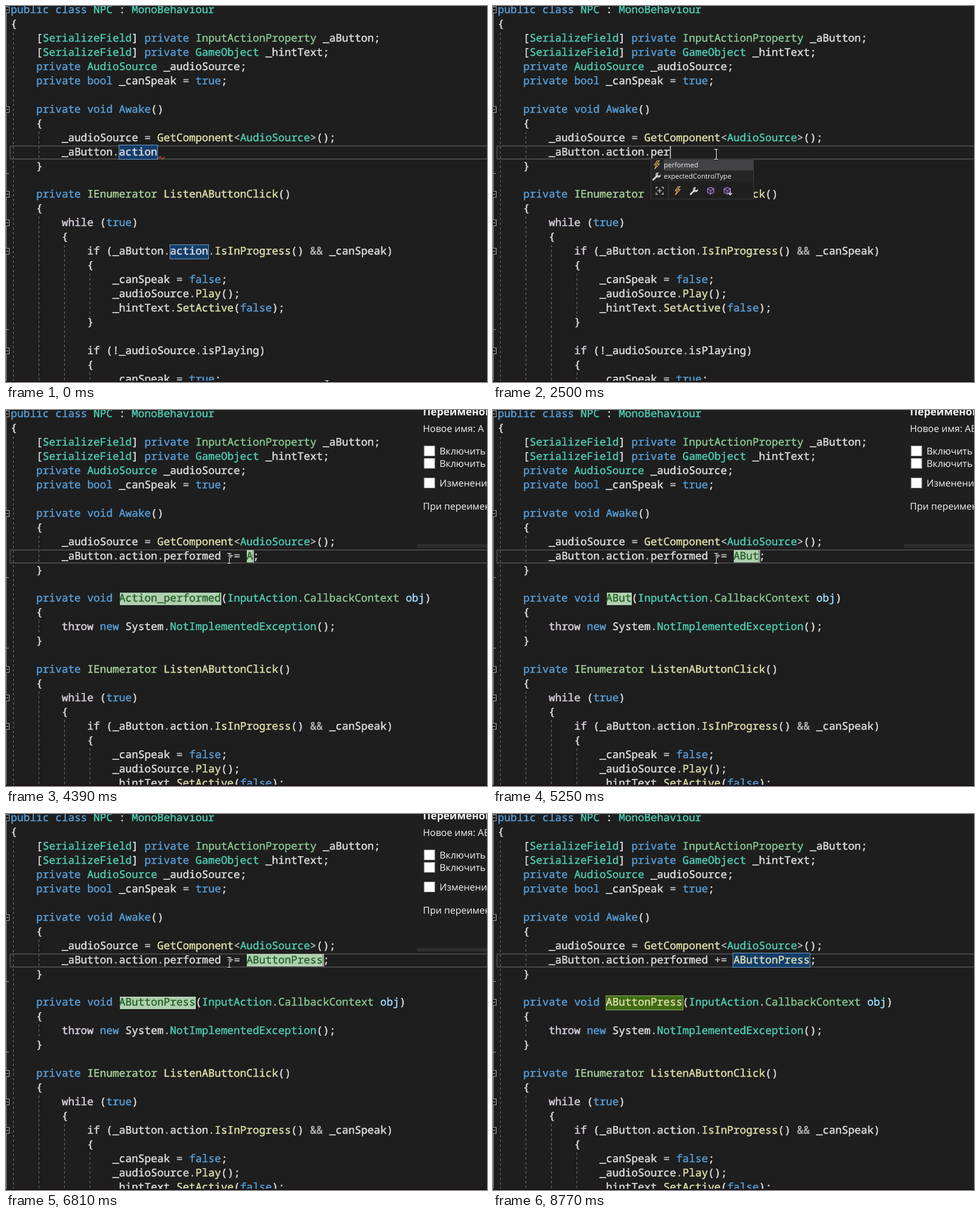
An HTML page for the animation above (8900 ms loop, 811 by 634 pixels).

```html
<!DOCTYPE html>
<html lang="ru">
<head>
<meta charset="utf-8">
<title>Code editor</title>
<style>
html, body { margin: 0; width: 100%; height: 100%; overflow: hidden; background: #1e1e1e; }
svg { display: block; width: 100vw; height: 100vh; }
text { white-space: pre; text-rendering: geometricPrecision; }
.code { font: 500 17.9px "Noto Sans Mono", "DejaVu Sans Mono", monospace; stroke-width: .5px; }
.ui { font: 11.5px "Open Sans", "Noto Sans", sans-serif; fill: #f1f1f1; }
.dlg { font: 16px "Open Sans", "Noto Sans", sans-serif; fill: #f5f5f5; }
.title { font-weight: 700; font-size: 17.5px; }
</style>
</head>
<body>
<svg id="stage" viewBox="0 0 811 634" preserveAspectRatio="none"></svg>
<script>
const LOOP = 8900, CW = 10.74, LH = 23.94, LEFT = 8, ROW = 10;
const stage = document.getElementById('stage');
const col = c => +(LEFT + c * CW).toFixed(2);
const base = i => Math.round(12.2 + LH * i);
const esc = s => s.replace(/&/g, '&amp;').replace(/</g, '&lt;');

const COLORS = {
  '#569cd6': 'public class private void bool true false new Awake',
  '#4ec9b0': 'NPC MonoBehaviour SerializeField GameObject AudioSource InputAction NotImplementedException',
  '#86c691': 'InputActionProperty CallbackContext',
  '#a9d09b': 'IEnumerator',
  '#dcdcaa': 'GetComponent ListenAButtonClick IsInProgress Play SetActive AButtonPress',
  '#d8cfdc': 'while if throw',
  '#9cdcfe': 'obj'
};
const ink = {};
for (const c in COLORS) COLORS[c].split(' ').forEach(w => ink[w] = c);
const LATE = /^(InputAction|CallbackContext|NotImplementedException)$/;

const HEAD = `public class NPC : MonoBehaviour
{
    [SerializeField] private InputActionProperty _aButton;
    [SerializeField] private GameObject _hintText;
    private AudioSource _audioSource;
    private bool _canSpeak = true;

    private void Awake()
    {
        _audioSource = GetComponent<AudioSource>();
`.split('\n');
const TAIL = `    private IEnumerator ListenAButtonClick()
    {
        while (true)
        {
            if (_aButton.action.IsInProgress() && _canSpeak)
            {
                _canSpeak = false;
                _audioSource.Play();
                _hintText.SetActive(false);
            }

            if (!_audioSource.isPlaying)
            {
                _canSpeak = true;`.split('\n');

const TYPED = [[0, ''], [1150, '.'], [1560, '.p'], [2110, '.pe'], [2370, '.per'], [2570, '.performed'],
  [2840, '.performed '], [2930, '.performed +'], [3040, '.performed +='], [3660, '.performed += ']];
const NAME = 'AButtonPress';
const KEYS = [4390, 4720, 4980, 5250, 5420, 5600, 5750, 6070, 6340, 6470, 6670, 6810];

const ALL = ['c*Clone', 'c*Reset', 'x*ChangeBinding', 'w*activeValueType', 'w actionMap', 'w activeControl',
  'w activeValueType', 'x AddBinding', 'x AddCompositeBinding'];
const BY_P = ['e performed', 'w phase', 'w expectedControlType', 'c PerformInteractiveRebinding'];
const BY_PE = ['e performed', 'w expectedControlType'];

const rect = (x, y, w, h, fill, stroke = 'none', sw = 1) =>
  `<rect x="${x}" y="${y}" width="${w}" height="${h}" fill="${fill}" stroke="${stroke}" stroke-width="${sw}"/>`;
const path = (d, stroke, sw = 1, fill = 'none', extra = '') =>
  `<path d="${d}" stroke="${stroke}" stroke-width="${sw}" fill="${fill}" ${extra}/>`;
const label = (x, y, s, cls, extra = '') => `<text class="${cls}" x="${x}" y="${y}" ${extra}>${esc(s)}</text>`;
const tint = c => `fill="${c}" stroke="${c}"`;
const boxed = (c, n, i, fill, stroke) =>
  rect(Math.round(col(c)) - .5, Math.floor(12.2 + LH * i) - 16.5, Math.round(n * CW) + 1, 24, fill, stroke);

function codeLine(s, i, late, marks) {
  let out = '';
  for (const m of s.matchAll(/\w+|\S/g)) {
    const w = m[0];
    let c = ink[w] || (/^[.=&+<>]$/.test(w) ? '#b8b8b8' : '#dcdcdc');
    if (late && LATE.test(w)) c = '#dcdcdc';
    if (marks && w === marks) c = '#27652b';
    out += `<tspan x="${col(m.index)}" ${tint(c)}>${esc(w)}</tspan>`;
  }
  return `<text class="code" y="${base(i)}">${out}</text>`;
}

function margin(added) {
  const o = added.lines, dy = o * LH;
  const guide = (x, a, b) => path(`M${x} ${a}V${b}`, '#747474', 1, 'none', 'stroke-dasharray="4 4"');
  let s = path('M.7 0V634', '#9a9a9a', 1);
  const folds = [0, 7, 13 + o, 15 + o, 17 + o, 24 + o];
  if (added.fold) folds.push(13);
  for (const i of folds) {
    const y = Math.round(6 + LH * i) + .5;
    s += rect(-3.5, y - 5, 9, 10, '#1e1e1e', '#a5a5a5') + path(`M-1 ${y}H3.5`, '#c8c8c8');
  }
  const ends = o ? [282, 401] : [282, 545];
  s += path(ends.map(y => `M0 ${y + .5}H5`).join(''), '#a5a5a5');
  s += guide(12.5, 45, 632) + guide(55.5, 212, 260);
  if (o) s += guide(55.5, 355, 379);
  s += guide(55.5, 355 + dy, 632) + guide(98.5, 403 + dy, 632);
  s += guide(141.5, 451 + dy, 525 + dy);
  return s + (o ? '' : guide(141.5, 618, 632));
}

function cube(x, y, arrow) {
  const s = path(`M${x} ${y - 6}l5.5 2.7v6.2l-5.5 3l-5.5 -3v-6.2zM${x - 5.5} ${y - 3.3}l5.5 2.8l5.5 -2.8M${x} ${y - .5}v6.4`, '#a47fd6', 1.1, '#39304a');
  return arrow ? s + path(`M${x + 5} ${y + 1}v6m-3 -3l3 3l3 -3`, '#e6e6e6', 1.3) : s;
}
const wrench = (x, y) => path(`M${x - 6} ${y + 6}l6.5 -6.5`, '#dcdcdc', 2.6, 'none', 'stroke-linecap="round"') +
  path(`M${x + 2} ${y - 5.5}a3.6 3.6 0 1 0 4 4l-2.6 1.8l-2.4 -2.2z`, '#dcdcdc', 1.4);
const bolt = (x, y) => path(`M${x + 1} ${y - 7}l-5 7h3.5l-3 7l8 -9h-4l4 -5z`, '#e3b56a', 1.1, '#4a3d26');
const icon = { c: cube, x: (x, y) => cube(x, y, true), w: wrench, e: bolt };

function popup(items, w) {
  const x = 266.5, y = 257.5, h = items.length * 19, bar = items.length > 8 ? 18 : 0;
  let s = rect(x, y, w, h + 30, '#252526', '#3b3b3f') + rect(288, y + 1, w - 22 - bar, 19, '#424245');
  items.forEach((it, i) => {
    const cy = 268 + i * 19, star = it[1] === '*';
    s += icon[it[0]](276, cy);
    if (star) s += label(288, cy + 4, '★', 'ui', 'style="font-size:10.5px"');
    s += label(star ? 301 : 288, cy + 4, it.slice(2), 'ui');
  });
  if (bar) {
    s += rect(413, 258, 17, h, '#2f2f31') + rect(417, 275, 9, 18, '#555558') +
      path('M417 270l4.5 -5l4.5 5zM417 418l4.5 5l4.5 -5z', 'none', 0, '#a0a0a0');
  }
  const by = y + h + 1, cy = by + 15;
  s += rect(267, by, w - 1, 28.5, '#1f1f20') + path(`M295.5 ${by + 2}v26`, '#3b3b3f');
  s += path(`M275 ${cy - 3}v-3h3M284 ${cy - 6}h3v3M287 ${cy + 3}v3h-3M278 ${cy + 6}h-3v-3M281 ${cy - 4}v8M277 ${cy}h8`, '#dcdcdc', 1.2);
  return s + bolt(311, cy) + wrench(339, cy) + cube(367, cy) + cube(395, cy, true);
}

function ghost(c, text) {
  const x = col(c), end = x + text.length * CW, y = base(ROW), grey = tint('#7c7c7c');
  let s = label(x, y, text, 'code', grey);
  for (const dx of [32, 77]) {
    s += rect(Math.round(end + dx) - .5, 235.5, 39, 22, '#252525', '#747474') + label(end + dx + 3, y + 2, 'Tab', 'code', tint('#858585'));
  }
  s += label(end + 132, y, 'чтобы принять', 'code', grey);
  const gx = end + 299, gy = 247;
  return s + `<g fill="none" stroke="#8a8a8a"><circle cx="${gx}" cy="${gy}" r="8" stroke-width="3" stroke-dasharray="3.4 2.88"/>` +
    `<circle cx="${gx}" cy="${gy}" r="6.3" stroke-width="1.4"/><circle cx="${gx}" cy="${gy}" r="2.8" stroke-width="1.4"/></g>`;
}

function dialog(name) {
  let s = rect(693, 0, 118, 232, '#1f1f1f') + rect(693, 226, 118, 6, '#2d2d2f');
  s += label(703, 9, 'Переименование', 'dlg title') + label(703, 37, 'Новое имя: ' + name, 'dlg');
  [[69, 'Включить комментарии'], [90, 'Включить строки'], [123, 'Изменения']].forEach(([y, t]) => {
    s += rect(705, y - 8.5, 18, 17, '#fff', '#8b8b8b') + label(731, y + 6, t, 'dlg');
  });
  return s + label(703, 168, 'При переименовании', 'dlg');
}

const squiggle = (x, y) => path(`M${x} ${y}l3 -3l4 4l4 -4`, '#d0473c', 1.3);

function mouse(t) {
  const glide = (t0, a, b) => {
    const k = Math.min(1, (Math.floor((t - t0) / 78.5) + 1) / 8), e = k * k * (3 - 2 * k);
    return a.map((v, i) => Math.round(v + (b[i] - v) * e));
  };
  let p;
  if (t < 70) p = [541, 640];
  else if (t < 7600) p = glide(70, [541, 640], [376, 250]);
  else if (t < 8700) p = glide(7600, [376, 250], [530, 617]);
  else if (t < 8770) p = [532, 621];
  else return '';
  const d = `M${p[0] - 3.5} ${p[1] - 8.5}h3l.5 .7l.5 -.7h3M${p[0] + .5} ${p[1] - 8}v16M${p[0] - 3.5} ${p[1] + 8.5}h3l.5 -.7l.5 .7h3`;
  return path(d, '#000', 3) + path(d, '#f4f4f4', 1.2);
}

function scene(t) {
  const added = t >= 3660, rename = t >= 3740 && t < 7140, late = t < 3990;
  const typed = TYPED.filter(e => e[0] <= t).pop()[1];
  const n = KEYS.filter(k => k <= t).length;
  const upper = n ? NAME.slice(0, n) : 'Action_performed';
  const lower = t < 4460 ? 'Action_performed' : upper;
  let line = '        _aButton.action' + typed, caret = line.length;
  if (added) { line += upper + ';'; caret += upper.length; }

  const lines = [...HEAD.slice(0, ROW), line, '    }', ''];
  if (added) lines.push(`    private void ${lower}(InputAction.CallbackContext obj)`, '    {',
    '        throw new System.NotImplementedException();', '    }', '');
  lines.push(...TAIL);

  let s = rect(0, 0, 811, 634, '#1e1e1e') + margin({ lines: added ? 5 : 0, fold: t >= 8700 });
  s += rect(7, 236, 830, 22, 'none', '#464646', 2);
  if (t < 1150) s += boxed(17, 6, 10, '#143d6b', '#6f9fc4') + boxed(25, 6, 17, '#143d6b', '#6f9fc4');
  if (rename) {
    s += rect(Math.round(col(37)) + 1, 236, Math.round(upper.length * CW) - 1, 21, '#b0d0b1');
    s += rect(Math.round(col(17)) + 1, 308, Math.round(lower.length * CW) - 1, 21, '#b0d0b1');
  }
  if (t >= 7600) s += boxed(37, 12, 10, '#143d6b', '#6f9fc4') + boxed(17, 12, 13, '#3f6b12', '#8fae62');

  lines.slice(0, 27).forEach((l, i) => {
    s += codeLine(l, i, late && i > 12, rename && (i === 10 ? upper : i === 13 ? lower : ''));
  });

  if (t < 1150) s += squiggle(257, 257);
  if (t >= 3520 && t < 3660) s += squiggle(396, 257);

  const blinkOn = (t >= 420 && t < 950) || (t >= 1150 && t < 3520) || (t >= 3740 && t < 8150);
  if (blinkOn) s += rect(col(caret) + .4, 236, 1.5, 21.5, '#d8d8d8');

  if (t >= 1360 && t < 1560) s += ghost(24, 'Clone();');
  if (t >= 1560 && t < 1630) s += ghost(25, '();');
  if (t >= 1290 && t < 1780) s += popup(ALL, 164);
  else if (t >= 1780 && t < 2190) s += popup(BY_P, 225);
  else if (t >= 2190 && t < 2570) s += popup(BY_PE, 173);
  if (t >= 3040 && t < 3520) {
    s += rect(404.5, 261.5, 351, 23, '#2b2b2e', '#4a4a4e') +
      label(411, 277, 'Action_performed;   (Нажмите клавишу TAB для вставки)', 'ui');
  }
  if (t >= 3810 && t < 7140) s += dialog(t < 4390 ? 'Action_performed' : upper);
  return s + rect(0, 632, 811, 2, '#1a1118') + mouse(t);
}

let shown = '';
function frame(now) {
  const s = scene(now % LOOP);
  if (s !== shown) stage.innerHTML = shown = s;
  requestAnimationFrame(frame);
}
frame(performance.now());
</script>
</body>
</html>
```
